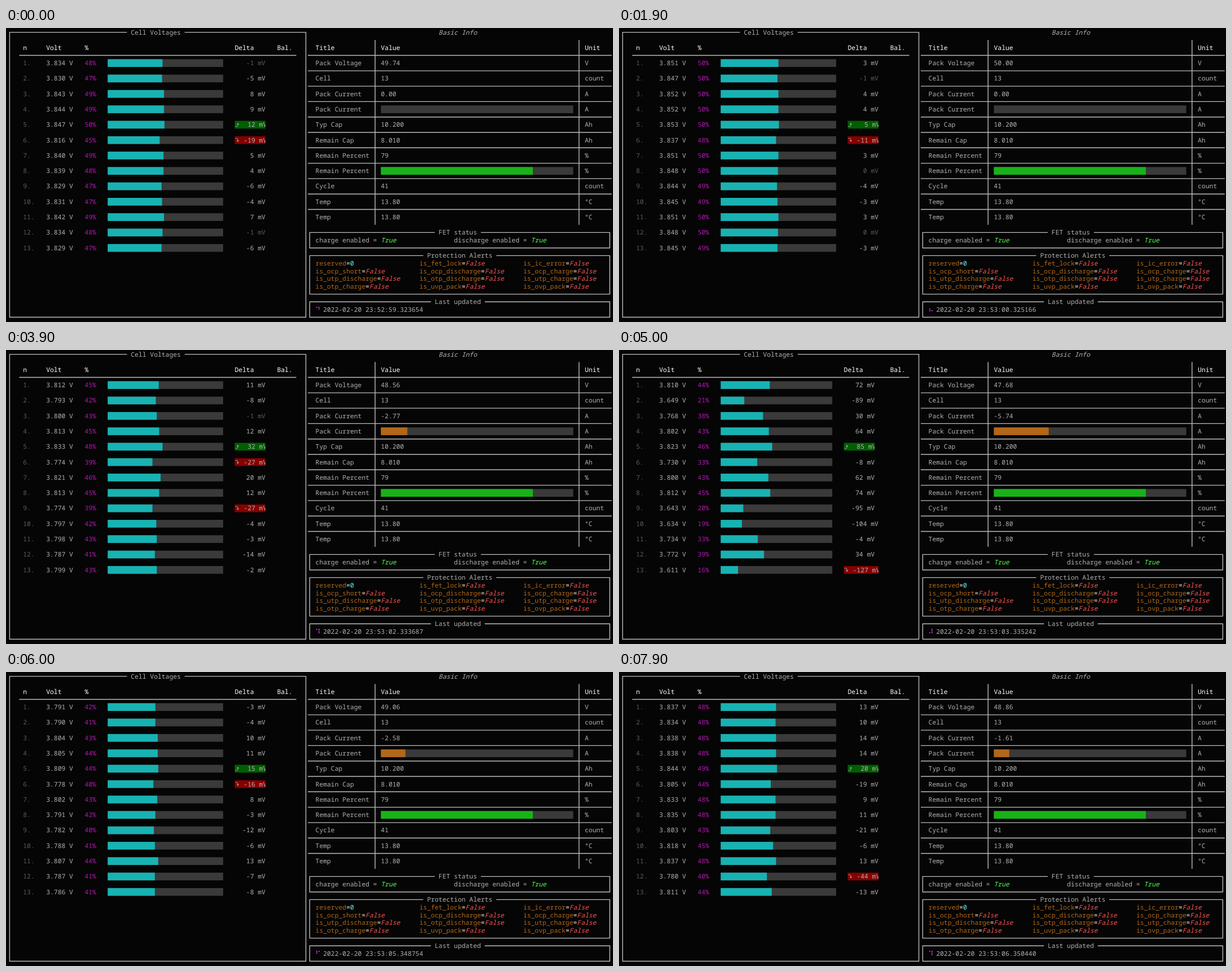
Recreate the animation shown at these times as an HTML page with a canvas. Size 1076 by 521 pixels, loop 8000 ms.

```html
<!DOCTYPE html>
<html lang="en">
<head>
<meta charset="utf-8">
<title>Battery monitor</title>
<style>
html, body { margin: 0; width: 100%; height: 100%; overflow: hidden; background: #050505; }
canvas { display: block; width: 1076px; height: 521px; }
</style>
</head>
<body>
<canvas id="stage" width="1076" height="521"></canvas>
<script>
const ctx = document.getElementById('stage').getContext('2d');
const LOOP = 8000, CW = 6.82, RH = 13.647;
const FONT = '11.367px "Noto Sans Mono", "DejaVu Sans Mono", monospace';
const C = {
  bg: '#050505', fg: '#b2b2b2', line: '#bcbcbc', white: '#ffffff', dim: '#5c5c5c', track: '#3a3a3a',
  cyan: '#18b2b2', green: '#18b218', orange: '#b26818', magenta: '#b218b2',
  up: '#005f00', down: '#870000',
  brightGreen: '#54ff54', brightRed: '#ff5454', brightCyan: '#54ffff', brightMagenta: '#ff54ff'
};

// Readings: start time, clock, pack volts, pack amps, cell millivolts above 3 V
const reading = (at, clock, volts, amps, cells) => ({ at, clock, volts, amps, cells });
const readings = [
  reading(0, '23:52:59.323654', 49.74, 0, [834, 830, 843, 844, 847, 816, 840, 839, 829, 831, 842, 834, 829]),
  reading(900, '23:53:00.325166', 50, 0, [851, 847, 852, 852, 853, 837, 851, 848, 844, 845, 851, 848, 845]),
  reading(2000, '23:53:01.326896', 49.96, -0.36, [825, 815, 802, 803, 825, 775, 823, 792, 784, 786, 805, 847, 797]),
  reading(3100, '23:53:02.333687', 48.56, -2.77, [812, 793, 800, 813, 833, 774, 821, 813, 774, 797, 798, 787, 799]),
  reading(4100, '23:53:03.335242', 47.68, -5.74, [810, 649, 768, 802, 823, 730, 800, 812, 643, 634, 734, 772, 611]),
  reading(6000, '23:53:05.348754', 49.06, -2.58, [791, 790, 804, 805, 809, 778, 802, 791, 782, 788, 807, 787, 786]),
  reading(7000, '23:53:06.350440', 48.86, -1.61, [837, 834, 838, 838, 844, 805, 833, 835, 803, 818, 837, 780, 811])
];
// The recovery reading lies halfway between its neighbours
const [low, high] = [readings[4], readings[5]];
readings.splice(5, 0, reading(5100, '23:53:04.341996', 48.37, -4.16,
  low.cells.map((v, i) => Math.round((v + high.cells[i]) / 2))));

// Spinner: [time, step count], linear in between
const spinKeys = [[0, 1], [1300, 20], [2400, 32], [2800, 33], [3100, 34], [3900, 42], [5000, 54], [6000, 70], [7900, 92]];
const spinDots = ['124', '145', '1456', '456', '3456', '356', '236', '1236', '123', '1234'];

const X = col => 3 + col * CW;
const Y = row => 7.6 + row * RH;
const mid = col => X(col + 0.5);

function text(str, col, row, color = C.fg, italic = false, dx = 0) {
  ctx.font = (italic ? 'italic ' : '') + FONT;
  ctx.fillStyle = color;
  ctx.fillText(str, X(col) + dx, Y(row) + 3.9);
}

function line(x1, y1, x2, y2) {
  ctx.beginPath();
  ctx.moveTo(x1, y1);
  ctx.lineTo(x2, y2);
  ctx.stroke();
}

function fillCells(col, row, width, color) {
  ctx.fillStyle = color;
  ctx.fillRect(X(col), Y(row) - RH / 2, width * CW, RH);
}

// Bars grow in eighths of a character
function bar(col, row, width, part, color) {
  fillCells(col, row, width, C.track);
  fillCells(col, row, Math.floor(width * 8 * part + 1e-6) / 8, color);
}

function panel(c1, r1, c2, r2, title, col) {
  const l = mid(c1), r = mid(c2), t = Y(r1), b = Y(r2);
  ctx.beginPath();
  ctx.moveTo(X(col - 1), t);
  ctx.lineTo(l, t);
  ctx.lineTo(l, b);
  ctx.lineTo(r, b);
  ctx.lineTo(r, t);
  ctx.lineTo(X(col + title.length + 1), t);
  ctx.stroke();
  text(title, col, r1);
}

function arrow(col, row, dir) {
  ctx.save();
  ctx.translate(X(col) + 1.2, Y(row));
  ctx.scale(1, dir);
  ctx.strokeStyle = ctx.fillStyle = C.fg;
  ctx.lineWidth = 0.9;
  ctx.beginPath();
  ctx.moveTo(0, 3);
  ctx.lineTo(2.2, 3);
  ctx.quadraticCurveTo(4.4, 3, 4.4, 0.5);
  ctx.lineTo(4.4, -1.5);
  ctx.stroke();
  ctx.beginPath();
  ctx.moveTo(2.4, -0.6);
  ctx.lineTo(4.4, -3.2);
  ctx.lineTo(6.4, -0.6);
  ctx.fill();
  ctx.restore();
}

function deltaCell(delta, col, row, dir) {
  const str = String(delta).padStart(3) + ' mV';
  if (!dir) return text(str, col + 2, row, Math.abs(delta) < 2 ? C.dim : C.fg);
  const width = str.length + 2;
  fillCells(col, row, width, dir > 0 ? C.up : C.down);
  arrow(col, row, dir);
  ctx.save();
  ctx.beginPath();
  ctx.rect(X(col), Y(row) - RH / 2, width * CW, RH);
  ctx.clip();
  text(str, col + 2, row, C.fg, false, 2.3);
  ctx.restore();
}

function cellTable({ cells }) {
  const mean = cells.reduce((a, b) => a + b) / cells.length;
  const deltas = cells.map(v => Math.round(v - mean));
  const top = Math.max(...deltas), bottom = Math.min(...deltas);
  const wide = bottom <= -100 ? 1 : 0;
  panel(0, 0, 77, 37, 'Cell Voltages', 32);
  [['n', 4], ['Volt', 10], ['%', 20], ['Delta', 59 - wide], ['Bal.', 70]]
    .forEach(([str, col]) => text(str, col, 2, C.white));
  line(X(3), Y(3), X(75), Y(3));
  cells.forEach((mv, i) => {
    const row = 4 + 2 * i, part = (mv - 500) / 700, d = deltas[i];
    text(i + 1 + '.', 4, row, C.dim);
    text('3.' + mv + ' V', 10, row);
    text(Math.round(part * 100) + '%', 20, row, C.magenta);
    bar(26, row, 30 - wide, part, C.cyan);
    deltaCell(d, 59 - wide, row, d === top ? 1 : d === bottom ? -1 : 0);
  });
}

function infoTable({ volts, amps }) {
  const rows = [
    ['Pack Voltage', volts.toFixed(2), 'V'],
    ['Cell', '13', 'count'],
    ['Pack Current', amps.toFixed(2), 'A'],
    ['Pack Current', [-amps / 20, C.orange], 'A'],
    ['Typ Cap', '10.200', 'Ah'],
    ['Remain Cap', '8.010', 'Ah'],
    ['Remain Percent', '79', '%'],
    ['Remain Percent', [0.79, C.green], '%'],
    ['Cycle', '41', 'count'],
    ['Temp', '13.80', '°C'],
    ['Temp', '13.80', '°C']
  ];
  text('Basic Info', 112, 0, C.fg, true);
  text('Title', 80, 2, C.white);
  text('Value', 97, 2, C.white);
  text('Unit', 150, 2, C.white);
  rows.forEach(([title, value, unit], i) => {
    const row = 4 + 2 * i;
    line(X(78), Y(row - 1), X(157), Y(row - 1));
    text(title, 80, row);
    text(unit, 150, row);
    if (Array.isArray(value)) bar(97, row, 50, ...value);
    else text(value, 97, row);
  });
  for (const col of [95, 148]) line(mid(col), Y(1), mid(col), Y(25));
}

function statusPanels() {
  panel(78, 26, 156, 28, 'FET status', 112);
  for (const [str, col] of [['charge enabled = ', 80], ['discharge enabled = ', 116]]) {
    text(str, col, 27);
    text('True', col + str.length, 27, C.brightGreen, true);
  }
  panel(78, 29, 156, 34, 'Protection Alerts', 109);
  const flags = ['reserved', 'is_fet_lock', 'is_ic_error',
    'is_ocp_short', 'is_ocp_discharge', 'is_ocp_charge',
    'is_utp_discharge', 'is_otp_discharge', 'is_utp_charge',
    'is_otp_charge', 'is_uvp_pack', 'is_ovp_pack'];
  flags.forEach((name, i) => {
    const col = 80 + 27 * (i % 3), row = 30 + Math.floor(i / 3), end = col + name.length;
    text(name, col, row, C.orange);
    text('=', end, row, C.white);
    if (i) text('False', end + 1, row, C.brightRed, true);
    else text('0', end + 1, row, C.brightCyan);
  });
}

function spinner(t) {
  const tick = Math.floor(t / 100) * 100;
  let k = 0;
  while (k < spinKeys.length - 2 && spinKeys[k + 1][0] <= tick) k++;
  const [[t1, n1], [t2, n2]] = [spinKeys[k], spinKeys[k + 1]];
  const step = Math.floor(n1 + (n2 - n1) * (tick - t1) / (t2 - t1) + 1e-6);
  ctx.fillStyle = C.brightMagenta;
  for (const dot of spinDots[step % 10]) {
    const n = dot - 1;
    ctx.fillRect(550.1 + (n > 2 ? 3.9 : 0), 494.1 + (n % 3) * 3, 1.7, 1.7);
  }
}

function draw(t) {
  const now = readings.filter(r => r.at <= t).pop();
  ctx.fillStyle = C.bg;
  ctx.fillRect(0, 0, 1076, 521);
  ctx.strokeStyle = C.line;
  ctx.lineWidth = 1.4;
  cellTable(now);
  infoTable(now);
  statusPanels();
  panel(78, 35, 156, 37, 'Last updated', 111);
  text('2022-02-20 ' + now.clock, 82, 36);
  spinner(t);
}

ctx.textRendering = 'geometricPrecision';
const start = performance.now();
function frame() {
  draw((performance.now() - start) % LOOP);
  requestAnimationFrame(frame);
}
frame();
</script>
</body>
</html>
```
